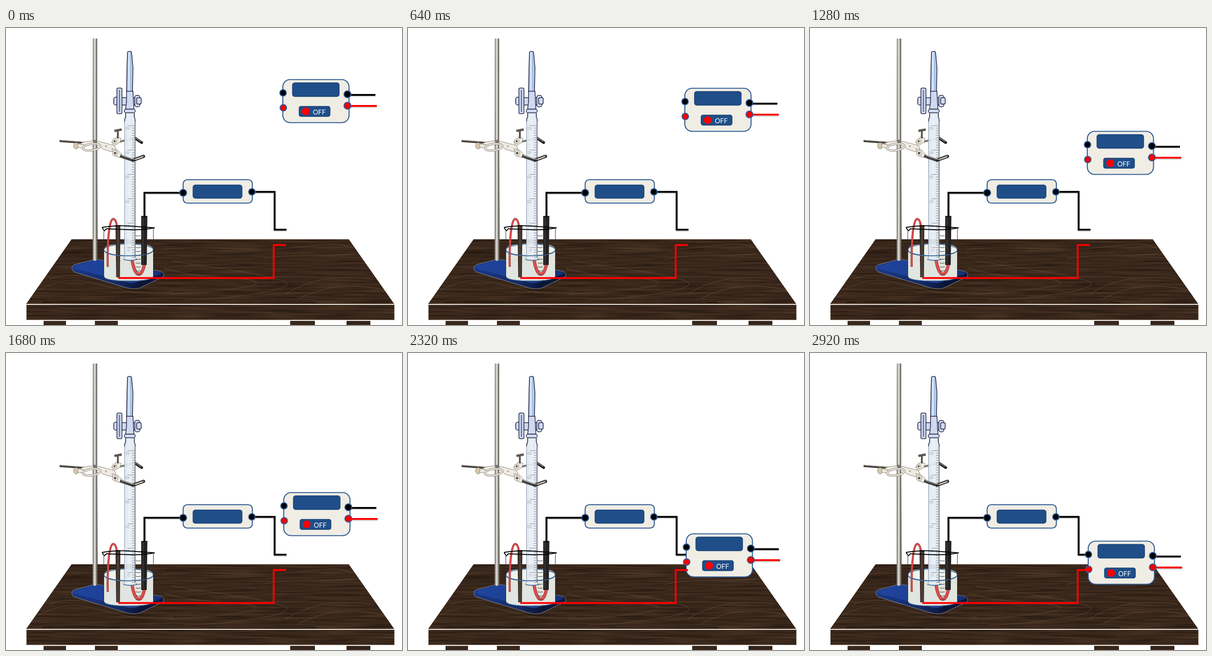
Recreate the animation shown at these times as an HTML page. Size 864x648 px, loop 3000 ms.

```html
<!DOCTYPE html>
<html lang="en">
<head>
<meta charset="utf-8">
<title>Titration circuit</title>
<style>
  html, body { margin: 0; width: 100%; height: 100%; overflow: hidden; background: #fff; }
  svg { position: absolute; left: 0; top: 0; width: 864px; height: 648px; fill: none; }
  #device { will-change: transform; }
  .panel { fill: #efede4; stroke: #2f5b94; stroke-width: 2.2; }
  .screen { fill: #1f4e89; stroke: #1b4273; stroke-width: 1.4; }
  .port { stroke: #2f5b94; stroke-width: 2.2; }
  .wire { stroke-width: 4; }
  .black { stroke: #000; }
  .red { stroke: #f00; }
  .shade { stroke: #000; stroke-opacity: .18; stroke-width: 5; }
  .glass { fill: #d0d9f0; stroke: #1d2340; stroke-width: 1.5; }
  .off { font: 14.4px Lato, Carlito, sans-serif; fill: #fff; }
  .num { font: 9px "Liberation Sans", Arial, sans-serif; fill: #a9abb0; }
</style>
</head>
<body>
<svg viewBox="0 0 864 648">
  <defs>
    <filter id="wood" x="0" y="0" width="100%" height="100%" color-interpolation-filters="sRGB">
      <feTurbulence type="fractalNoise" baseFrequency=".009 .26" numOctaves="3" seed="8"/>
      <feColorMatrix values=".2 0 0 0 .125  .16 0 0 0 .075  .12 0 0 0 .047  0 0 0 0 1"/>
      <feComposite in2="SourceGraphic" operator="in"/>
    </filter>
    <linearGradient id="steel">
      <stop offset="0" stop-color="#6e6b64"/>
      <stop offset=".2" stop-color="#a5a29a"/>
      <stop offset=".42" stop-color="#e9e7e0"/>
      <stop offset=".6" stop-color="#b5b2aa"/>
      <stop offset=".8" stop-color="#6a6760"/>
      <stop offset="1" stop-color="#45423d"/>
    </linearGradient>
    <linearGradient id="tip">
      <stop offset="0" stop-color="#8ea9d6"/>
      <stop offset=".4" stop-color="#e4eefa"/>
      <stop offset=".6" stop-color="#a3bee4"/>
      <stop offset="1" stop-color="#c4d4ee"/>
    </linearGradient>
    <linearGradient id="tube">
      <stop offset="0" stop-color="#d5dfea"/>
      <stop offset=".4" stop-color="#e9eff4"/>
      <stop offset="1" stop-color="#d9e2ec"/>
    </linearGradient>
    <linearGradient id="base">
      <stop offset="0" stop-color="#20449c"/>
      <stop offset=".6" stop-color="#1d3f94"/>
      <stop offset="1" stop-color="#162f72"/>
    </linearGradient>
    <linearGradient id="rim">
      <stop offset="0" stop-color="#1b3987"/>
      <stop offset=".5" stop-color="#142a66"/>
      <stop offset=".75" stop-color="#0b1433"/>
      <stop offset="1" stop-color="#0d1a45"/>
    </linearGradient>
    <linearGradient id="rod">
      <stop offset="0" stop-color="#251c18"/>
      <stop offset=".5" stop-color="#55443b"/>
      <stop offset="1" stop-color="#29201c"/>
    </linearGradient>
    <clipPath id="top"><path d="M143 461H748L847 602H44Z"/></clipPath>
  </defs>

  <!-- table -->
  <g fill="#3a281c">
    <path filter="url(#wood)" d="M143 461H748L847 602H44Z"/>
    <path filter="url(#wood)" d="M44 604H848V637H44Z"/>
    <path filter="url(#wood)" d="M82 639h49v9h-49zM194 639h50v9h-50zM620 639h54v9h-54zM743 639h52v9h-52z"/>
  </g>
  <g clip-path="url(#top)" stroke="#8a6a4e" stroke-opacity=".3" stroke-width="1.5">
    <path d="M70 572C130 545 150 546 205 560S300 585 365 575M95 548C130 535 165 538 200 548"/>
    <path d="M345 524C420 548 500 540 540 552S430 578 350 580M360 508C460 525 560 535 605 552S500 590 390 594"/>
    <path d="M610 580C670 546 720 538 800 548M640 590C700 560 760 556 825 572M560 505C620 490 680 500 760 492"/>
    <path d="M340 484C430 470 520 492 640 478S720 475 760 480"/>
  </g>
  <path d="M44 637.5V603H848V637.5Z" stroke="#eeeae4" stroke-width="1.5"/>
  <path d="M82 601V598H102M224 598.5H244V602M652 598.5H674V602" stroke="#100a07" stroke-width="1.2"/>

  <!-- stand -->
  <path d="M144 522Q145 517 151 516L196 504 338 531Q346 535 344 542L292 567Q280 571 264 567L151 533Q143 530 144 522Z" fill="url(#rim)" stroke="#8a8c96"/>
  <path d="M146 521L196 505 336 531Q342 534 335 538L284 555Q275 558 264 555L150 525Z" fill="url(#base)"/>
  <path d="M189.500 23H199V250L200 506Q194 510 189 506V250Z" fill="url(#steel)"/>

  <!-- back jaw -->
  <path d="M244 249L281 240" stroke="#77746f" stroke-width="4"/>
  <path d="M281 240L296 250" stroke="#272523" stroke-width="6" stroke-linecap="round"/>
  <path d="M283 240L295 248" stroke="#9a9893" stroke-width="1.5"/>

  <!-- beaker contents -->
  <path d="M213.500 484Q213 470 268 470T321.500 484V541Q321 552 268 552T213.500 541Z" fill="#e9ede4" fill-opacity=".96"/>
  <ellipse cx="267.500" cy="484" rx="54" ry="13" fill="#eef3ee" stroke="#3e699b" stroke-width="1.800"/>
  <g stroke="#93302f" stroke-width="4.500">
    <path d="M222 521C221 485 223 417 234 416.500Q240 417 242 433"/>
    <path d="M275 505C278 525 283 537 290 537S301 524 303 508" stroke-width="7"/>
  </g>
  <g stroke="#d94d4e" stroke-width="3.200">
    <path d="M222 520C221 485 223 417 234 416.500Q240 417 242 433"/>
    <path d="M275 505C278 525 283 537 290 537S301 524 303 508" stroke-width="5.500"/>
  </g>

  <!-- burette -->
  <g class="glass">
    <path d="M265 54Q265 51 269.500 51T274 54L277 86 276 139H263L264 86Z" fill="url(#tip)"/>
    <path d="M252 152H288V168H252Z"/>
    <rect x="235" y="151" width="9" height="17" rx="4"/>
    <rect x="242" y="131" width="11" height="56" rx="3"/>
    <path d="M247.500 135V183" stroke="#747fae" stroke-width="3"/>
    <rect x="281" y="147" width="11" height="25" rx="4"/>
    <rect x="285" y="152" width="10" height="14" rx="3"/>
    <path d="M263 138H277L279 177H261L263 160Z"/>
    <path d="M261 184H280V194Q282 198 282 202V501L286 505Q271 509 256 505L258.500 501V202Q259 197 261 194Z" fill="url(#tube)" fill-opacity=".92" stroke="#8b98ae" stroke-width="1"/>
    <path d="M261 186V194Q258.500 198 258.500 204M280 186V194Q282 198 282 204"/>
    <rect x="258" y="177" width="24" height="8" rx="4"/>
    <path d="M256 505Q271 509 286 505" stroke="#3e699b"/>
  </g>
  <path d="M281.500 204V501" stroke="#4a5160" stroke-width="1.200"/>
  <g id="scale"></g>

  <!-- clamp -->
  <path d="M117 246.500L176 251" stroke="#3f3b37" stroke-width="4.500"/>
  <path d="M119 245.500L174 249" stroke="#a29e97" stroke-width="1"/>
  <g fill="#efebe2" stroke="#8b8478" stroke-width="1">
    <path d="M164 251Q178 245 200 247L216 251 236 256 240 263 230 270 211 264 204 255Q184 250 166 257Z"/>
    <ellipse cx="153" cy="257" rx="5.500" ry="7" fill="#d6c7ac"/>
    <path d="M157 253L170 255 168 262 156 260Z"/>
    <path d="M230 249L242 237 251 241 249 249 236 257Z"/>
    <path d="M231 263L243 266 253 276 248 283 235 278Z"/>
    <circle cx="237" cy="247" r="5"/>
    <circle cx="238" cy="273" r="6"/>
  </g>
  <ellipse cx="187" cy="260" rx="19" ry="7" stroke="#918b81" stroke-width="4.500" transform="rotate(-8 187 260)"/>
  <ellipse cx="187" cy="260" rx="19" ry="7" stroke="#ece8df" stroke-width="2.500" transform="rotate(-8 187 260)"/>
  <path d="M190 244H199V251H190Z" fill="#7a766e"/>
  <g fill="#5d5851">
    <circle cx="237" cy="247" r="2.300"/><circle cx="238" cy="273" r="2.800"/>
    <path d="M242 225H246V241H242ZM236 222L252 219 253 224 237 227Z"/>
    <circle cx="218" cy="258" r="2" fill="#aaa49a"/>
  </g>
  <path d="M249 279L278 289" stroke="#42403d" stroke-width="6.500"/>
  <path d="M278 288L300 280" stroke="#262422" stroke-width="7" stroke-linecap="round"/>
  <path d="M252 278L279 287 301 279" stroke="#a9a7a2" stroke-width="1.600"/>
  <path d="M282 287L299 281" stroke="#d9d8d4" stroke-width="2"/>

  <!-- electrodes and beaker glass -->
  <path d="M239 430H249.500L248.500 544H240.500Z" fill="url(#rod)"/>
  <path d="M295 410H308.500L307 517H295Z" fill="#242223"/>
  <path d="M299 414V514" stroke="#3d3939" stroke-width="2"/>
  <path id="marks" stroke="#333" stroke-width="1"/>
  <path d="M213.500 484Q216 497 268 497T321.500 484" stroke="#3e699b" stroke-width="1.800"/>
  <path d="M213.500 441V542Q216 552 268 552T321.500 542V437" stroke="#252b31"/>
  <path d="M215 545Q225 552 268 552T321 544" stroke="#3e699b" stroke-width="1.500"/>
  <path d="M213 441L210 435Q238 430 268 432T324 436Q300 441 268 440T219 438L214 443" stroke="#000" stroke-width="2" stroke-linejoin="round"/>

  <!-- meter -->
  <path class="shade" d="M303 412V361H380M544 359H587V442H612"/>
  <path class="wire black" d="M302 412V359.500H380M543 357.500H586V440H612"/>
  <rect class="panel" x="386.500" y="331" width="151" height="51" rx="9"/>
  <rect class="screen" x="408" y="342.500" width="107" height="29" rx="5"/>
  <circle class="port" cx="386.500" cy="359.500" r="7.500" fill="#000"/>
  <circle class="port" cx="536.500" cy="357.500" r="7" fill="#000"/>
</svg>

<svg id="device" viewBox="0 0 864 648">
  <path class="shade" d="M750 147.500H806M750 172H809"/>
  <path class="wire black" d="M750 146H806"/>
  <path class="wire red" d="M750 170H809"/>
  <rect class="panel" x="604" y="112.500" width="144.500" height="94" rx="16"/>
  <rect class="screen" x="625" y="119.500" width="102" height="30" rx="5"/>
  <rect class="screen" x="639.500" y="171" width="67.500" height="22" rx="4"/>
  <circle cx="654" cy="182" r="8.500" fill="#f00"/>
  <text class="off" x="669.500" y="188.500">OFF</text>
  <circle class="port" cx="604.500" cy="141.500" r="7" fill="#000"/>
  <circle class="port" cx="605" cy="174" r="7" fill="#f00"/>
  <circle class="port" cx="745" cy="144.500" r="7.500" fill="#000"/>
  <circle class="port" cx="745" cy="169.500" r="7.500" fill="#f00"/>
</svg>

<svg viewBox="0 0 864 648">
  <path class="wire red" d="M245 545.500H584V473.500H611"/>
</svg>

<script>
  // Burette graduations, numbered upside down
  let scale = '';
  for (let i = 0; i <= 54; i++) {
    const y = 213 + i * 5.32, len = i % 10 ? 7 : 17;
    scale += `<path d="M282 ${y}h${-len}" stroke="#858b96"/>`;
    if (i % 10 === 0) {
      scale += `<text class="num" transform="translate(270 ${y + 3}) rotate(180)">${50 - i}</text>`;
    }
  }
  document.getElementById('scale').innerHTML = scale;

  let marks = '';
  for (let y = 453; y < 546; y += 8.5) marks += `M283 ${y}q5 2 11 0`;
  document.getElementById('marks').setAttribute('d', marks);

  // Constant acceleration, steady fall, constant deceleration
  const LOOP = 3000, STEP = 40, START = 199, RAMP = 1031, END = 2725, SPEED = .1993;
  const DROP = SPEED * (END - START - RAMP);

  function fall(t) {
    if (t <= START) return 0;
    if (t >= END) return DROP;
    if (t < START + RAMP) return SPEED * (t - START) ** 2 / (2 * RAMP);
    if (t > END - RAMP) return DROP - SPEED * (END - t) ** 2 / (2 * RAMP);
    return SPEED * (t - START - RAMP / 2);
  }

  const device = document.getElementById('device');
  function draw() {
    const t = Math.floor(performance.now() % LOOP / STEP) * STEP;
    const y = fall(t);
    device.style.transform = `translate(${Math.round(y * .0098)}px, ${Math.round(y)}px)`;
    requestAnimationFrame(draw);
  }
  draw();
</script>
</body>
</html>
```
